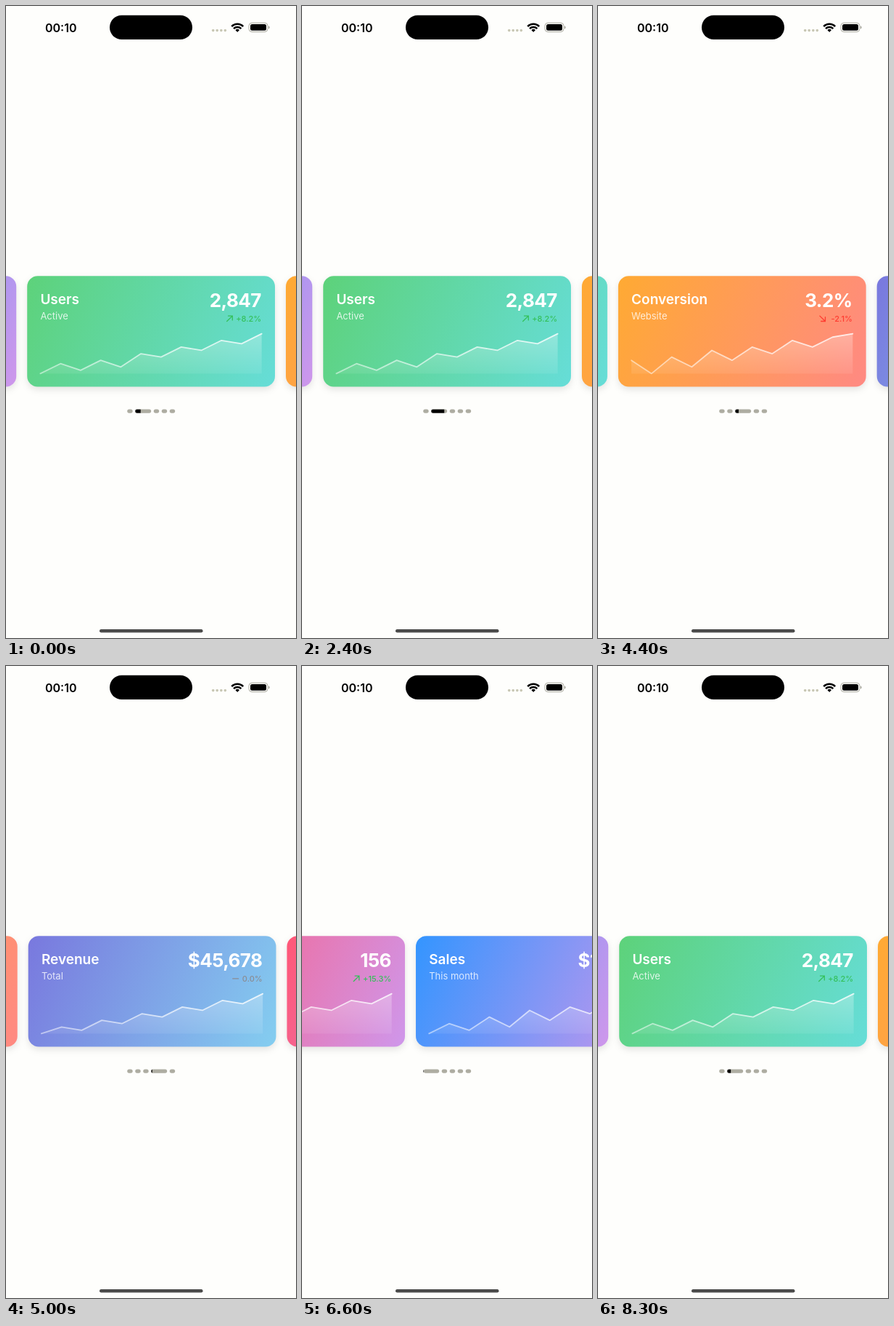
Recreate the animation shown at these times as an HTML page. Size 400 by 869 pixels, loop 8400 ms.

```html
<!DOCTYPE html>
<html lang="en">
<head>
<meta charset="utf-8">
<title>Metric carousel</title>
<style>
  html, body { margin: 0; width: 100%; height: 100%; overflow: hidden; background: #fefefc; }
  svg { display: block; width: 100%; height: 100%; font-family: Inter, Roboto, sans-serif; }
  .face { filter: drop-shadow(0 4px 5px rgba(0, 0, 0, .1)); }
  .title { font-size: 19px; font-weight: 600; fill: #fff; }
  .sub { font-size: 13px; fill: #fff; fill-opacity: .8; }
  .value { font-size: 26px; font-weight: 700; letter-spacing: -.6px; fill: #fff; text-anchor: end; }
  .trend { font-size: 11px; font-weight: 500; text-anchor: end; }
</style>
</head>
<body>
<svg id="stage" viewBox="0 0 400 869">
  <defs>
    <linearGradient id="area" gradientUnits="userSpaceOnUse" x1="0" y1="79" x2="0" y2="134">
      <stop stop-color="#fff" stop-opacity=".3"/>
      <stop offset="1" stop-color="#fff" stop-opacity=".08"/>
    </linearGradient>
    <linearGradient id="line" gradientUnits="userSpaceOnUse" x1="18" y1="0" x2="324" y2="0">
      <stop stop-color="#fff" stop-opacity=".5"/>
      <stop offset="1" stop-color="#fff" stop-opacity=".8"/>
    </linearGradient>
    <clipPath id="pill"><rect y="554.4" width="22" height="5.4" rx="2.7"/></clipPath>
  </defs>
  <rect width="400" height="869" fill="#fefefc"/>
  <g id="cards"></g>
  <g id="dots"></g>

  <text x="54" y="35.5" font-size="16" font-weight="600">00:10</text>
  <rect x="143" y="12.7" width="114" height="33.3" rx="16.6"/>
  <g fill="#c8c7b4">
    <circle cx="285.7" cy="33.6" r="1.8"/><circle cx="291.2" cy="33.6" r="1.8"/>
    <circle cx="296.8" cy="33.6" r="1.8"/><circle cx="302.3" cy="33.6" r="1.8"/>
  </g>
  <g fill="none" stroke="#000" stroke-width="2.5">
    <path d="M311.2 28.1a11.4 11.4 0 0 1 16 0"/>
    <path d="M314 31.2a7.5 7.5 0 0 1 10.4 0"/>
  </g>
  <path d="M316.4 33.1a4 4 0 0 1 5.6 0L319.2 36z"/>
  <rect x="335.1" y="23.2" width="25.8" height="12.4" rx="4" fill="none" stroke="#a9a89d"/>
  <rect x="337" y="25.1" width="22" height="8.6" rx="2.5"/>
  <path d="M362 27.3q1.6.6 1.6 2.1t-1.6 2.1z" fill="#a9a89d"/>
  <rect x="129" y="857" width="142.5" height="4.4" rx="2.2" fill="#4b4b4a"/>
</svg>
<script>
const LOOP = 8400, STEP = 100, PITCH = 356.8, LEFT = 29.2;
const DOT = 7.5, PILL = 22, GAP = 3.5, FILL_TIME = 5000;
const GREEN = '#34c05a', RED = '#ff3b30', GRAY = '#8a8c93';

const cards = [
  { title: 'Sales', sub: 'This month', value: '$12,345', trend: '+12.5%', dir: 1, tone: GREEN, mark: 271,
    colors: ['#3395ff', '#cf97eb'], levels: [0, 3, 1, 5, 2, 7, 4, 8, 6, 10, 9, 12] },
  { title: 'Users', sub: 'Active', value: '2,847', trend: '+8.2%', dir: 1, tone: GREEN, mark: 275.5,
    colors: ['#5dd27a', '#66ddd8'], levels: [0, 3, 1, 4, 2, 6, 5, 8, 7, 10, 9, 12] },
  { title: 'Conversion', sub: 'Website', value: '3.2%', trend: '-2.1%', dir: -1, tone: RED, mark: 278,
    colors: ['#ffaa33', '#ff8983'], levels: [4, 0, 5, 2, 7, 4, 8, 6, 10, 8, 11, 12] },
  { title: 'Revenue', sub: 'Total', value: '$45,678', trend: '0.0%', dir: 0, tone: GRAY, mark: 282,
    colors: ['#7978de', '#84cef0'], levels: [0, 2, 1, 4, 3, 6, 5, 8, 7, 10, 9, 12] },
  { title: 'Orders', sub: 'New', value: '156', trend: '+15.3%', dir: 1, tone: GREEN, mark: 271,
    colors: ['#ff5777', '#cf97eb'], levels: [0, 2, 1, 4, 3, 6, 5, 8, 7, 10, 9, 12] }
];

const ease = u => u < .5 ? 2 * u * u : 1 - 2 * (1 - u) ** 2;
const autoMove = t => ease(Math.min(1, Math.max(0, (t - 3322) / 350)));
// A flick gathers speed up to its midpoint, then settles exponentially.
const flick = (mid, tau) => t => t < mid
  ? .5 * Math.exp((t - mid) / tau)
  : 1 - .5 * Math.exp((mid - t) / tau);

const moves = [autoMove, flick(4704, 62), flick(5570, 55), flick(6585, 45), flick(7220, 60)];
const switches = [
  { at: -1700, card: 1 }, { at: 3322, card: 2 }, { at: 4660, card: 3 },
  { at: 5550, card: 4 }, { at: 6430, card: 0 }, { at: 7170, card: 1 }
];

function add(parent, tag, attrs, text) {
  const el = document.createElementNS('http://www.w3.org/2000/svg', tag);
  set(el, attrs);
  if (text) el.textContent = text;
  return parent.appendChild(el);
}
function set(el, attrs) {
  for (const key in attrs) el.setAttribute(key, attrs[key]);
}

function buildCard(card, i) {
  const grad = add(document.querySelector('defs'), 'linearGradient',
    { id: 'card' + i, gradientUnits: 'userSpaceOnUse', x1: 0, y1: 0, x2: 342, y2: 152.4 });
  card.colors.forEach((color, k) => add(grad, 'stop', { offset: k, 'stop-color': color }));

  const g = add(document.getElementById('cards'), 'g', {});
  add(g, 'rect', { class: 'face', width: 341.8, height: 152.4, rx: 14.5, fill: `url(#card${i})` });
  add(g, 'text', { class: 'title', x: 18.2, y: 38.8 }, card.title);
  add(g, 'text', { class: 'sub', x: 18.2, y: 60 }, card.sub);
  add(g, 'text', { class: 'value', x: 322.6, y: 42.5 }, card.value);
  add(g, 'text', { class: 'trend', x: 323, y: 62.6, fill: card.tone }, card.trend);
  const arrow = card.dir > 0 ? 'M0 8L7.6.6M1.8.6H7.6V6.4'
    : card.dir < 0 ? 'M0 .6L7.6 8M1.8 8H7.6V2.2' : 'M0 4.3H8';
  add(g, 'path', { d: arrow, transform: `translate(${card.mark} 54.3)`, fill: 'none',
    stroke: card.tone, 'stroke-width': 1.3, 'stroke-linecap': 'round' });

  const line = 'M' + card.levels.map((v, k) =>
    `${(18.2 + k * 27.75).toFixed(2)} ${(134.2 - v * 4.56).toFixed(2)}`).join('L');
  add(g, 'path', { d: line + 'V134.2H18.2Z', fill: 'url(#area)' });
  add(g, 'path', { d: line, fill: 'none', stroke: 'url(#line)', 'stroke-width': 1.8,
    'stroke-linejoin': 'round', 'stroke-linecap': 'round' });
  return g;
}

const faces = cards.map(buildCard);
const dotLayer = document.getElementById('dots');
const bar = attrs => add(dotLayer, 'rect', { y: 554.4, height: 5.4, ...attrs });
const dots = cards.map(() => bar({ rx: 2.7, fill: '#aeada2' }));
const fillBar = bar({ 'clip-path': 'url(#pill)' });
const pillClip = document.querySelector('#pill rect');

function render(t) {
  const pos = moves.reduce((sum, move) => sum + move(t), 1);
  faces.forEach((face, i) => {
    const raw = i - pos + 2.5;
    const d = raw - Math.floor(raw / 5) * 5 - 2.5;
    set(face, {
      transform: `translate(${(LEFT + d * PITCH).toFixed(2)} 371.2)`,
      display: Math.abs(d) < 1.2 ? 'inline' : 'none'
    });
  });

  const now = switches.filter(s => s.at <= t).pop();
  const age = t - now.at;
  const grow = ease(Math.min(1, age / 200));
  let x = 167.2;
  dots.forEach((dot, i) => {
    const active = i === now.card;
    const slot = active ? PILL : DOT;
    const width = active ? DOT + (PILL - DOT) * grow : DOT;
    set(dot, { x: x + slot - width, width });
    if (active) {
      set(pillClip, { x });
      set(fillBar, { x, width: PILL * Math.min(1, age / FILL_TIME) });
    }
    x += slot + GAP;
  });
}

// The screen refreshes ten times a second.
function tick() {
  const t = performance.now() % LOOP;
  render(Math.floor(t / STEP) * STEP);
  requestAnimationFrame(tick);
}
tick();
</script>
</body>
</html>
```
